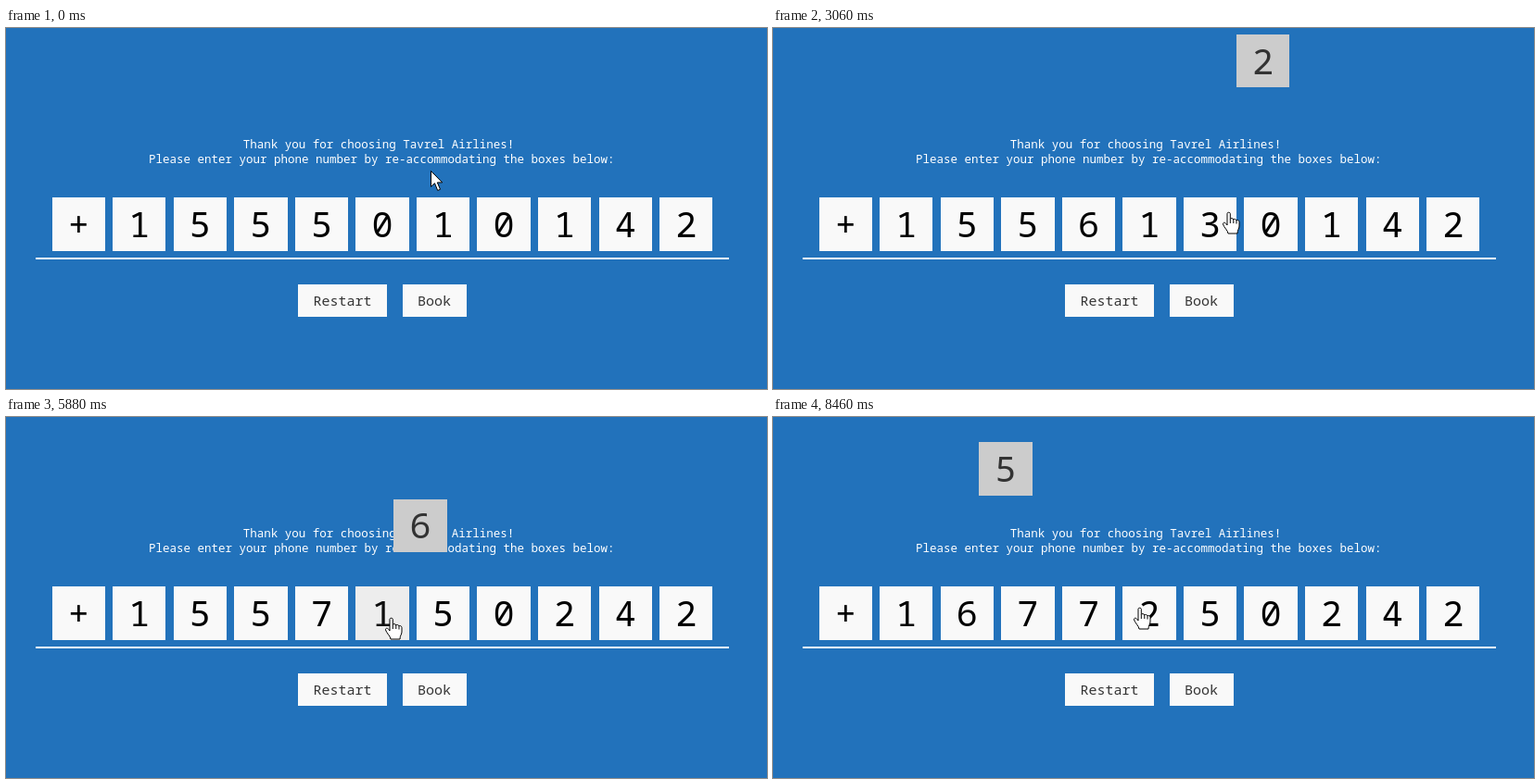
These frames come from a looping animation (821x390 px, 8520 ms). An HTML page:

```html
<!DOCTYPE html>
<html lang="en">
<head>
<meta charset="utf-8">
<title>Phone number boxes</title>
<style>
  html, body { margin: 0; width: 100%; height: 100%; overflow: hidden; background: #2272bb; }
  svg { display: block; width: 821px; height: 390px; }
  text { font-family: "Noto Sans Mono", "DejaVu Sans Mono", monospace; white-space: pre; }
  .intro { font-size: 12.5px; font-weight: 500; fill: #fff; }
  .digit { font-size: 38.5px; text-anchor: middle; }
  .label { font-size: 15px; fill: #333; }
  rect { shape-rendering: crispEdges; }
</style>
</head>
<body>
<svg viewBox="0 0 821 390" xmlns="http://www.w3.org/2000/svg">
  <rect width="821" height="390" fill="#2272bb"/>
  <text class="intro" x="255.7" y="130">Thank you for choosing Tavrel Airlines!</text>
  <text class="intro" x="154" y="146">Please enter your phone number by re-accommodating the boxes below:</text>
  <rect x="32" y="248" width="748" height="2" fill="#fff"/>
  <rect x="315" y="277" width="96" height="35" fill="#f9f9f9"/>
  <rect x="428" y="277" width="69" height="35" fill="#f9f9f9"/>
  <text class="label" x="331.5" y="300">Restart</text>
  <text class="label" x="444" y="300">Book</text>
  <g id="row"></g>
  <g id="air"></g>
  <g fill="#fff" stroke="#000" stroke-linejoin="round">
    <path id="arrow" d="M.5 .5V17.5l4-3.8 3.2 7.8 2.8-1.2-3.2-7.4h5.4z"/>
    <g id="hand">
      <path d="M-2 1.5C-2-.2 1.3-.2 1.3 1.5V7.5C1.6 6.2 4.6 6.4 4.8 8C5.2 7 7.8 7.3 8 9C8.5 8 11 8.6 11 10.5V15C11 18 9 19 9 23H-1C-1 20-5.5 16.5-6.5 13C-6.8 11-4.5 10.6-3.2 12.4L-2 14z"/>
      <path fill="none" d="M1.3 7.5V12M4.8 8V12M8 9V12.5"/>
    </g>
  </g>
</svg>
<script>
const LOOP = 8520, STEP = 60, GRAVITY = 0.00417;
const START = "+1555010142";
const SIZE = 57.3, PITCH = 65.55, LEFT = 49.6, TOP = 183.3;

const $ = id => document.getElementById(id);
const clamp = v => Math.max(0, Math.min(1, v));
const mix = (a, b, p) => a + (b - a) * p;
const gray = v => `rgb(${[v, v, v].map(Math.round)})`;
const slotX = i => LEFT + PITCH * i;
const show = (el, on) => el.style.display = on ? "" : "none";
const move = (el, x, y) => el.setAttribute("transform", `translate(${x} ${y})`);

// Each click throws a box out of its slot: time, slot, sideways speed in px per ms
const throws = [
  [655, 4, 0.37], [1430, 5, -0.473], [2100, 6, 0.5], [2861, 6, 0.286],
  [3400, 6, 0.35], [3875, 6, 0.466], [4640, 8, -0.418], [5630, 4, 0.426],
  [6070, 5, -0.18], [6836, 3, 0.238], [7605, 3, -0.4], [8187, 2, 0.153]
].map(([at, slot, drift]) => ({ at, slot, drift }));

const clicksBefore = (slot, t) => throws.filter(h => h.slot === slot && h.at < t).length;

// Boxes far from the middle, and repeated throws from one slot, fly higher
function liftOf({ slot, at }) {
  const away = Math.abs(slot - 4);
  return 0.9 + 0.24 * Math.max(0, away - 1) + 0.16 * Math.min(1, away) * clicksBefore(slot, at);
}

// The pointer visits every clicked box, with a few places on the way
const pointer = [
  ...throws.map(h => [h.at, slotX(h.slot) + 20, 207]),
  [0, 458, 154], [1620, 410, 167], [3060, 492, 199], [4620, 588, 194],
  [5880, 416, 217], [7140, 305, 189], [8460, 396, 206]
].sort((a, b) => a[0] - b[0]);

function pointerAt(t) {
  const next = pointer.findIndex(k => k[0] > t);
  const i = next < 0 ? pointer.length - 1 : next;
  const [t0, x0, y0] = pointer[i - 1], [t1, x1, y1] = pointer[i];
  const p = clamp((t - t0) / (t1 - t0)), ease = p * p * (3 - 2 * p);
  return [mix(x0, x1, ease), mix(y0, y1, ease)].map(Math.round);
}

function add(parent, tag, attrs) {
  const el = document.createElementNS("http://www.w3.org/2000/svg", tag);
  for (const key in attrs) el.setAttribute(key, attrs[key]);
  return parent.appendChild(el);
}

function makeBox(parent) {
  const g = add(parent, "g", {});
  const back = add(g, "rect", { width: SIZE, height: SIZE });
  const text = add(g, "text", { class: "digit", x: SIZE / 2, y: 42.7 });
  return { g, back, text };
}

function paint(box, digit, shade) {
  box.text.textContent = digit;
  box.back.setAttribute("fill", gray(mix(249, 204, shade)));
  box.text.setAttribute("fill", gray(mix(0, 51, shade)));
}

function digitAt(slot, t) {
  const clicks = clicksBefore(slot, t);
  return clicks ? (+START[slot] + clicks) % 10 : START[slot];
}

function hoverShade(slot, t) {
  const next = throws.find(h => h.slot === slot && h.at > t);
  return next ? clamp((t - next.at + 240) / 180) : 0;
}

const slots = [...START].map((_, i) => {
  const box = makeBox($("row"));
  move(box.g, slotX(i), TOP);
  return box;
});
for (const h of throws) {
  h.lift = liftOf(h);
  h.box = makeBox($("air"));
  paint(h.box, digitAt(h.slot, h.at), 1);
}

function draw(t) {
  slots.forEach((box, i) => paint(box, digitAt(i, t), hoverShade(i, t)));

  for (const h of throws) {
    const age = t - h.at;
    const y = TOP - h.lift * age + GRAVITY / 2 * age * age;
    show(h.box.g, age >= 0 && y < 390);
    move(h.box.g, slotX(h.slot) + h.drift * age, y);
  }

  const [x, y] = pointerAt(t);
  const over = y >= TOP && y < TOP + SIZE &&
    slots.some((_, i) => x >= slotX(i) && x < slotX(i) + SIZE);
  show($("hand"), over);
  show($("arrow"), !over);
  move($("hand"), x, y);
  move($("arrow"), x, y);
}

const begin = performance.now();
function frame() {
  const t = (performance.now() - begin) % LOOP;
  draw(Math.floor(t / STEP) * STEP);
  requestAnimationFrame(frame);
}
frame();
</script>
</body>
</html>
```
